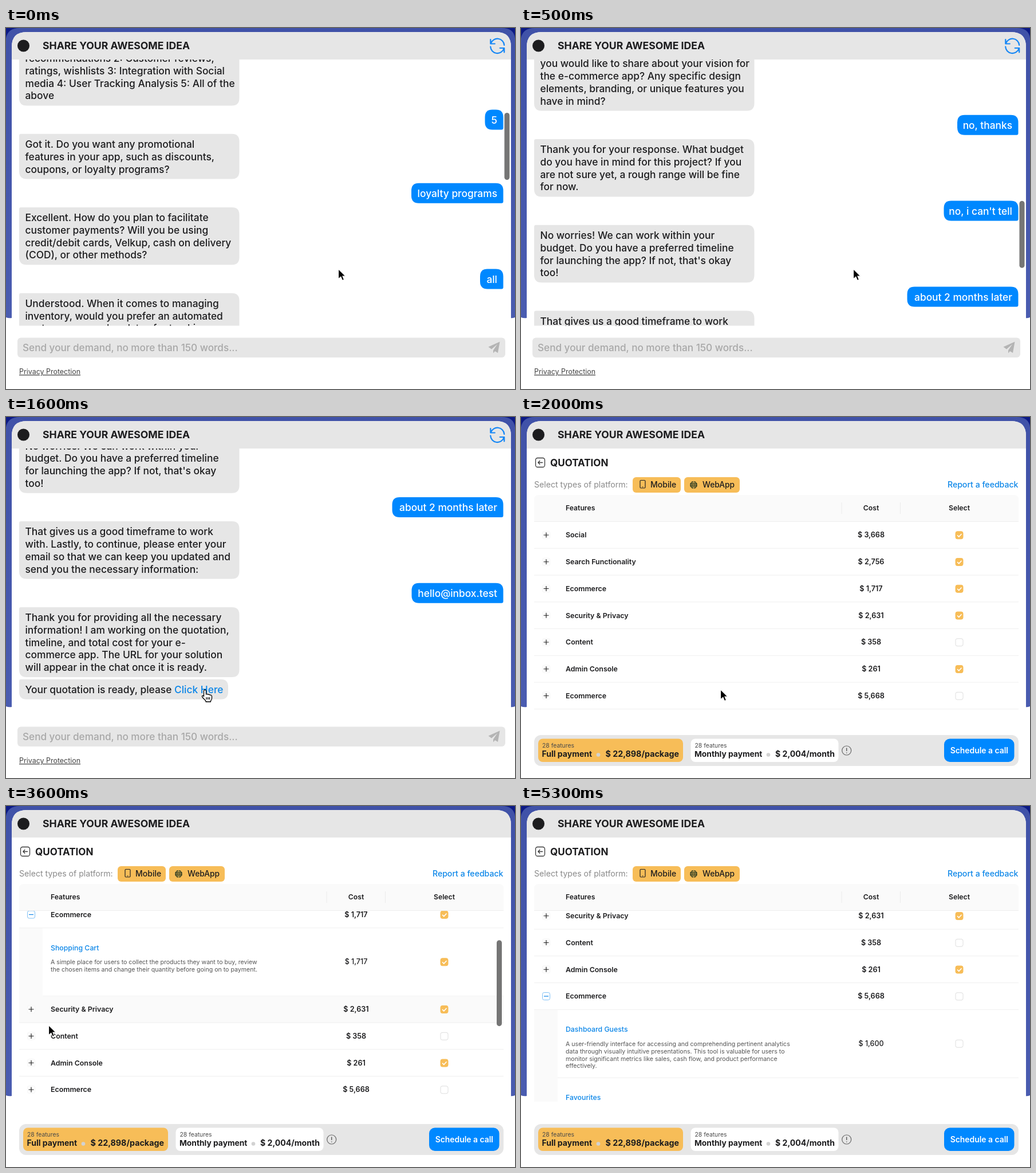
An HTML page for the animation above (5400 ms loop, 889 by 630 pixels).

```html
<!DOCTYPE html>
<html lang="en">
<head>
<meta charset="utf-8">
<title>Share your awesome idea</title>
<style>
html, body { margin: 0; width: 100%; height: 100%; overflow: hidden; background: #fff; }
svg { display: block; width: 889px; height: 630px; }
text { font-family: Inter, "Noto Sans", sans-serif; white-space: pre; }
</style>
</head>
<body>
<svg id="stage" viewBox="0 0 889 630" xmlns="http://www.w3.org/2000/svg">
  <defs>
    <clipPath id="chatClip"><rect x="10" y="55" width="872" height="464.5"/></clipPath>
    <clipPath id="tableClip"><rect x="23" y="183" width="846" height="333"/></clipPath>
    <linearGradient id="side" x1="0" y1="0" x2="0" y2="1">
      <stop offset="0" stop-color="#4052a8"/><stop offset="1" stop-color="#4a5cb0"/>
    </linearGradient>
  </defs>
  <rect width="889" height="630" fill="#fff"/>
  <rect width="889" height="60" fill="#0c1a85"/>
  <path d="M0 505V18Q3 0 24 0H866Q887 0 889 18V505Q884 507 880 506H10Q5 507 0 505Z" fill="url(#side)"/>
  <path d="M10 630V33Q10 7 36 7H856Q882 7 882 33V630Z" fill="#fff"/>
  <path d="M10 55V33Q10 7 36 7H856Q882 7 882 33V55Z" fill="#e6e6e6"/>
  <circle cx="30.5" cy="31" r="10.5" fill="#1c1c1e"/>
  <g id="head"></g>

  <g id="chat">
    <g fill="none" stroke="#1687f5" stroke-width="2.2" stroke-linecap="round" stroke-linejoin="round">
      <path d="M846.3 20v7.5h7.5M846.8 27A12 12 0 0 1 870.2 30"/>
      <path d="M870.2 42.5v-7.5h-7.5M869.7 35.5A12 12 0 0 1 846.2 32.5"/>
    </g>
    <g clip-path="url(#chatClip)"><g id="feed"></g></g>
    <rect id="chatThumb" x="870.5" width="9" height="117" rx="4.5" fill="#757575"/>
    <rect x="20" y="540.5" width="852" height="34.5" rx="6" fill="#e6e6e6"/>
    <path d="M862.5 547.5L842.5 556.5L848 560.5L858 552L851 562.5V567.5L854 564L859 567Z" fill="#b4b4b4"/>
    <g id="chatFoot"></g>
  </g>

  <g id="quote">
    <g fill="none" stroke="#3a3a3a" stroke-width="1.3" stroke-linecap="round" stroke-linejoin="round">
      <rect x="25.5" y="71.5" width="16" height="16" rx="3.5"/>
      <path d="M37.5 79.5H29.8M32.8 76.5L29.8 79.5L32.8 82.5"/>
    </g>
    <rect x="195" y="105" width="84" height="27" rx="6" fill="#f7bd58"/>
    <rect x="285" y="105" width="97" height="27" rx="6" fill="#f7bd58"/>
    <rect x="208" y="110.5" width="9" height="13.5" rx="1.5" fill="none" stroke="#222" stroke-width="1.2"/>
    <path d="M211.5 122h2" stroke="#222"/>
    <circle cx="301.5" cy="118.5" r="6.5" fill="#23331c"/>
    <path d="M295 118.5h13M296 115h11M296 122h11M301.5 112v13M301.5 112q-6 6.5 0 13q6-6.5 0-13" fill="none" stroke="#d9ae55" stroke-width=".8"/>
    <path d="M23 183V144Q23 136 31 136H861Q869 136 869 144V183Z" fill="#fafafa"/>
    <path d="M560 149v20M662.5 149v20" stroke="#ececec"/>
    <g clip-path="url(#tableClip)"><g id="rows"></g></g>
    <path d="M23 182.5H869" stroke="#efefef"/>
    <rect id="tableThumb" x="857" width="9" height="150" rx="4.5" fill="#757575"/>
    <rect x="23" y="555" width="846" height="54" rx="12" fill="#e6e6e6"/>
    <rect x="30" y="561.5" width="253" height="40.5" rx="8" fill="#f7bd58"/>
    <rect x="296.5" y="561.5" width="258" height="40.5" rx="8" fill="#fff"/>
    <rect x="739" y="561.5" width="122.5" height="40.5" rx="10" fill="#0088ff"/>
    <circle cx="135" cy="589.5" r="3.3" fill="#d2d2d2"/>
    <circle cx="432" cy="589.5" r="3.3" fill="#d2d2d2"/>
    <circle cx="568.7" cy="582" r="8" fill="none" stroke="#666" stroke-width="1.2"/>
    <path d="M568.7 577.5v5.5M568.7 585.5v1.3" stroke="#555" stroke-width="1.4"/>
    <g id="quoteText"></g>
  </g>

  <g id="cursor">
    <path id="arrow" d="M-.5-.5V17L3.8 13.3L6.4 19.6L9.5 18.2L7 12.2H12.3Z" fill="#000" stroke="#fff" stroke-width="1.2"/>
    <path id="hand" d="M-3.5 1.5Q-1.5-1.5.5 1.5V8Q2.5 6.5 4 8.5Q6 7.3 7.2 9.5Q10 8.5 10.5 11.5V15Q10.5 17 8.5 19.5V21H0V19.5L-6 13Q-7.500 10.500-5 10.200L-3.500 11.500ZM1 13v4M3.800 13v4M6.500 13v4" fill="#fff" stroke="#000" stroke-width="1.3" stroke-linejoin="round"/>
  </g>
</svg>
<script>
const NS = "http://www.w3.org/2000/svg", LOOP = 5400, STEP = 100;
const INK = "#1c1c1e", BLUE = "#0b86e8", ROW = 46.75, ITEM = 118.5;
const $ = id => document.getElementById(id);

function add(parent, tag, attrs, content) {
  const el = document.createElementNS(NS, tag);
  for (const k in attrs) el.setAttribute(k, attrs[k]);
  if (content !== undefined) el.textContent = content;
  parent.appendChild(el);
  return el;
}
const text = (parent, x, y, str, size, weight = 500, fill = INK, anchor = "start") =>
  add(parent, "text", { x, y, "font-size": size, "font-weight": weight, fill, "text-anchor": anchor }, str);
const show = (el, on) => el.setAttribute("display", on ? "inline" : "none");
const move = (el, x, y) => el.setAttribute("transform", `translate(${x} ${y})`);

// Linear interpolation over [time, value, ...] keys
function at(keys, t) {
  if (t <= keys[0][0]) return keys[0].slice(1);
  for (let i = 1; i < keys.length; i++) {
    const a = keys[i - 1], b = keys[i];
    if (t <= b[0]) return a.slice(1).map((v, j) => v + (b[j + 1] - v) * (t - a[0]) / (b[0] - a[0]));
  }
  return keys[keys.length - 1].slice(1);
}

// Chat: "bot" replies on the left, "me" answers on the right with their left edge
const talk = [
  { bot: "recommendations 2: Customer reviews,|ratings, wishlists 3: Integration with Social|media 4: User Tracking Analysis 5: All of the|above" },
  { me: "5", x: 836.5 },
  { bot: "Got it. Do you want any promotional|features in your app, such as discounts,|coupons, or loyalty programs?" },
  { me: "loyalty programs", x: 708 },
  { bot: "Excellent. How do you plan to facilitate|customer payments? Will you be using|credit/debit cards, Velkup, cash on delivery|(COD), or other methods?" },
  { me: "all", x: 828 },
  { bot: "Understood. When it comes to managing|inventory, would you prefer an automated|system or manual updates for tracking|product availability?" },
  { me: "automated system", x: 692.5 },
  { bot: "Great choice. Is there any other information|you would like to share about your vision for|the e-commerce app? Any specific design|elements, branding, or unique features you|have in mind?" },
  { me: "no, thanks", x: 762 },
  { bot: "Thank you for your response. What budget|do you have in mind for this project? If you|are not sure yet, a rough range will be fine|for now." },
  { me: "no, i can't tell", x: 738.5 },
  { bot: "No worries! We can work within your|budget. Do you have a preferred timeline|for launching the app? If not, that's okay|too!" },
  { me: "about 2 months later", x: 674.5 },
  { bot: "That gives us a good timeframe to work|with. Lastly, to continue, please enter your|email so that we can keep you updated and|send you the necessary information:" },
  { me: "hello@inbox.test", x: 708.5 },
  { bot: "Thank you for providing all the necessary|information! I am working on the quotation,|timeline, and total cost for your e-|commerce app. The URL for your solution|will appear in the chat once it is ready." }
];

function bubble(x, y, r, h, mine) {
  const a = mine ? 13 : 3, b = mine ? 3 : 13;
  add($("feed"), "path", {
    d: `M${x} ${y + a}q0 ${-a} ${a} ${-a}H${r - 13}q13 0 13 13V${y + h - b}q0 ${b} ${-b} ${b}H${x + 13}q-13 0 -13 -13Z`,
    fill: mine ? "#0088ff" : "#e6e6e6"
  });
}

function buildChat() {
  const feed = $("feed"), size = 17.36;
  let y = 35;
  for (const m of talk) {
    let h = 35;
    if (m.me) {
      bubble(m.x, y, 868.5, h, true);
      text(feed, 858, y + 24.2, m.me, size, 500, "#fff", "end");
    } else {
      const lines = m.bot.split("|");
      h = lines.length * 21.7 + 13.6;
      bubble(23, y, 407.5, h, false);
      lines.forEach((s, i) => text(feed, 33.5, y + 24.2 + i * 21.75, s, size));
    }
    y += h + 7.2;
  }
  y -= 3.4;
  bubble(23, y, 388, 35, false);
  const last = text(feed, 33.5, y + 24.2, "", size);
  add(last, "tspan", {}, "Your quotation is ready, please ");
  add(last, "tspan", { fill: BLUE }, "Click Here");
  text($("chatFoot"), 29, 563.7, "Send your demand, no more than 150 words...", 17.15, 500, "#a8a8a8");
  text($("chatFoot"), 23, 604, "Privacy Protection", 12.45, 400, "#444").setAttribute("text-decoration", "underline");
}

// Quotation table: name, cost, selected
const features = [
  ["Social", "3,668", 1], ["Search Functionality", "2,756", 1], ["Ecommerce", "1,717", 1],
  ["Security & Privacy", "2,631", 1], ["Content", "358", 0], ["Admin Console", "261", 1],
  ["Ecommerce", "5,668", 0], ["Integrations", "3,747", 1], ["Customer Insight", "1,833", 1],
  ["Games", "471", 1], ["Smart Features", "1,728", 1]
];
const rows = [];

function check(g, y, on) {
  add(g, "rect", { x: 759, y: y - 6.5, width: 13, height: 13, rx: 3, fill: on ? "#f7bd58" : "#fff", stroke: on ? "#f7bd58" : "#dedede" });
  if (on) add(g, "path", { d: `M762 ${y}l2.8 2.8l4.7 -5`, fill: "none", stroke: "#fff", "stroke-width": 1.6 });
}

function item(g, y, title, lines, cost, on) {
  text(g, 78, y + 38.5, title, 12.3, 500, BLUE);
  lines.split("|").forEach((s, i) => text(g, 78, y + 63 + i * 12.9, s, 10.6, 400, "#555"));
  text(g, 611.5, y + 63.2, "$ " + cost, 12.5, 500, INK, "middle");
  check(g, y + 59, on);
  add(g, "path", { d: `M64 ${y + ITEM}H869`, stroke: "#efefef" });
}

function buildRow([name, cost, on]) {
  const g = add($("rows"), "g", {}), mid = ROW / 2 - 0.4;
  const back = add(g, "rect", { x: 23, y: 0, width: 846, height: ROW, fill: "#fafafa" });
  const plus = add(g, "g", {}), minus = add(g, "g", {}), more = add(g, "g", {});
  add(plus, "rect", { x: 37.5, y: mid - 6.5, width: 13, height: 13, rx: 3, fill: "#fff", stroke: "#f4f4f4" });
  add(plus, "path", { d: `M39.5 ${mid}h9M44 ${mid - 4.5}v9`, stroke: "#222", "stroke-width": 1.2 });
  add(minus, "rect", { x: 37.5, y: mid - 6.5, width: 13, height: 13, rx: 3, fill: "#fff", stroke: "#7fc0f5" });
  add(minus, "path", { d: `M40 ${mid}h8`, stroke: BLUE, "stroke-width": 1.2 });
  text(g, 78, mid + 4.4, name, 12.4, 600);
  text(g, 611.5, mid + 4.4, "$ " + cost, 12.6, 600, INK, "middle");
  check(g, mid + 0.3, on);
  add(g, "path", { d: `M23 ${ROW - 0.5}H869`, stroke: "#efefef" });
  rows.push({ g, back, plus, minus, more });
}

function buildQuote() {
  const q = $("quoteText");
  features.forEach(buildRow);
  const first = rows[2].more, second = rows[6].more;
  add(first, "rect", { x: 23, y: ROW, width: 41, height: ITEM, fill: "#fafafa" });
  item(first, ROW, "Shopping Cart", "A simple place for users to collect the products they want to buy, review|the chosen items and change their quantity before going on to payment.", "1,717", 1);
  add(second, "rect", { x: 23, y: ROW, width: 41, height: ITEM * 2, fill: "#fafafa" });
  item(second, ROW, "Dashboard Guests", "A user-friendly interface for accessing and comprehending pertinent analytics|data through visually intuitive presentations. This tool is valuable for users to|monitor significant metrics like sales, cash flow, and product performance|effectively.", "1,600", 0);
  text(second, 78, ROW + ITEM + 38.5, "Favourites", 12.3, 500, BLUE);

  text(q, 51, 85.6, "QUOTATION", 17, 700);
  text(q, 23, 123.2, "Select types of platform:", 14.1, 400, "#8a8a8a");
  text(q, 226, 123.2, "Mobile", 14, 500);
  text(q, 317, 123.2, "WebApp", 13.8, 500);
  text(q, 868.5, 123.2, "Report a feedback", 14.1, 500, BLUE, "end");
  text(q, 78, 163.4, "Features", 12.2, 600);
  text(q, 611.5, 163.4, "Cost", 12.2, 600, INK, "middle");
  text(q, 765.5, 163.4, "Select", 12.2, 600, INK, "middle");
  text(q, 37, 577, "28 features", 10.4, 400, "#4a4a4a");
  text(q, 303.5, 577, "28 features", 10.4, 400, "#4a4a4a");
  text(q, 36.5, 593.2, "Full payment", 14, 700);
  text(q, 276, 593.2, "$ 22,898/package", 14.3, 700, INK, "end");
  text(q, 303, 593.2, "Monthly payment", 13.8, 700);
  text(q, 548, 593.2, "$ 2,004/month", 14.1, 700, INK, "end");
  text(q, 800.3, 586.8, "Schedule a call", 13.9, 600, "#fff", "middle");
}

const OPEN = 1800, EXPAND1 = 2800, EXPAND2 = 4800;
const chatScroll = [0, 70, 170, 280.5, 430, 590, 740, 847.8, 888, 901.5].map((v, i) => [i * 100, v]);
const tableScroll = [[3200, 0], [3400, 40], [3800, 180], [4000, 245], [4200, 273]];
const pointer = [
  [1000, 581, 421], [1500, 349, 476], [2200, 349, 476], [2600, 75, 292], [2800, 44, 296],
  [3000, 44, 296], [3200, 75, 383], [4400, 75, 383], [4700, 44, 329]
];

function draw(t) {
  const quoting = t >= OPEN;
  show($("chat"), !quoting);
  show($("quote"), quoting);

  const [cs] = at(chatScroll, t);
  move($("feed"), 0, -cs);
  $("chatThumb").setAttribute("y", 148 + cs * 0.2604);
  show($("chatThumb"), t < 1400);

  const [ts] = at(tableScroll, t);
  const hover = t < 2500 ? -1 : t < 3300 ? 2 : t < 4500 ? 3 : t < EXPAND2 ? 6 : -1;
  rows.forEach((r, i) => {
    const open = (i === 2 && t >= EXPAND1) || (i === 6 && t >= EXPAND2);
    const shift = i > 2 && t >= EXPAND1 ? ITEM : 0;
    const push = i > 6 && t >= EXPAND2 ? ITEM * 2 : 0;
    move(r.g, 0, 183 + i * ROW + shift + push - ts);
    show(r.back, i === hover);
    show(r.plus, !open);
    show(r.minus, open);
    show(r.more, open);
  });
  $("tableThumb").setAttribute("y", 185 + ts * 122 / 273);
  show($("tableThumb"), t >= 3300 && t < 4700);

  const [px, py] = at(pointer, t);
  const hand = (t >= 1500 && t < OPEN) || (t >= 2800 && t <= 3000) || t >= 4700;
  move($("cursor"), px, py);
  show($("arrow"), !hand);
  show($("hand"), hand);
  show($("cursor"), t < 5200);
}

text($("head"), 64, 37.3, "SHARE YOUR AWESOME IDEA", 17.6, 700);
buildChat();
buildQuote();

const start = performance.now();
function tick() {
  const t = (performance.now() - start) % LOOP;
  draw(Math.floor(t / STEP) * STEP);
  requestAnimationFrame(tick);
}
tick();
</script>
</body>
</html>
```
